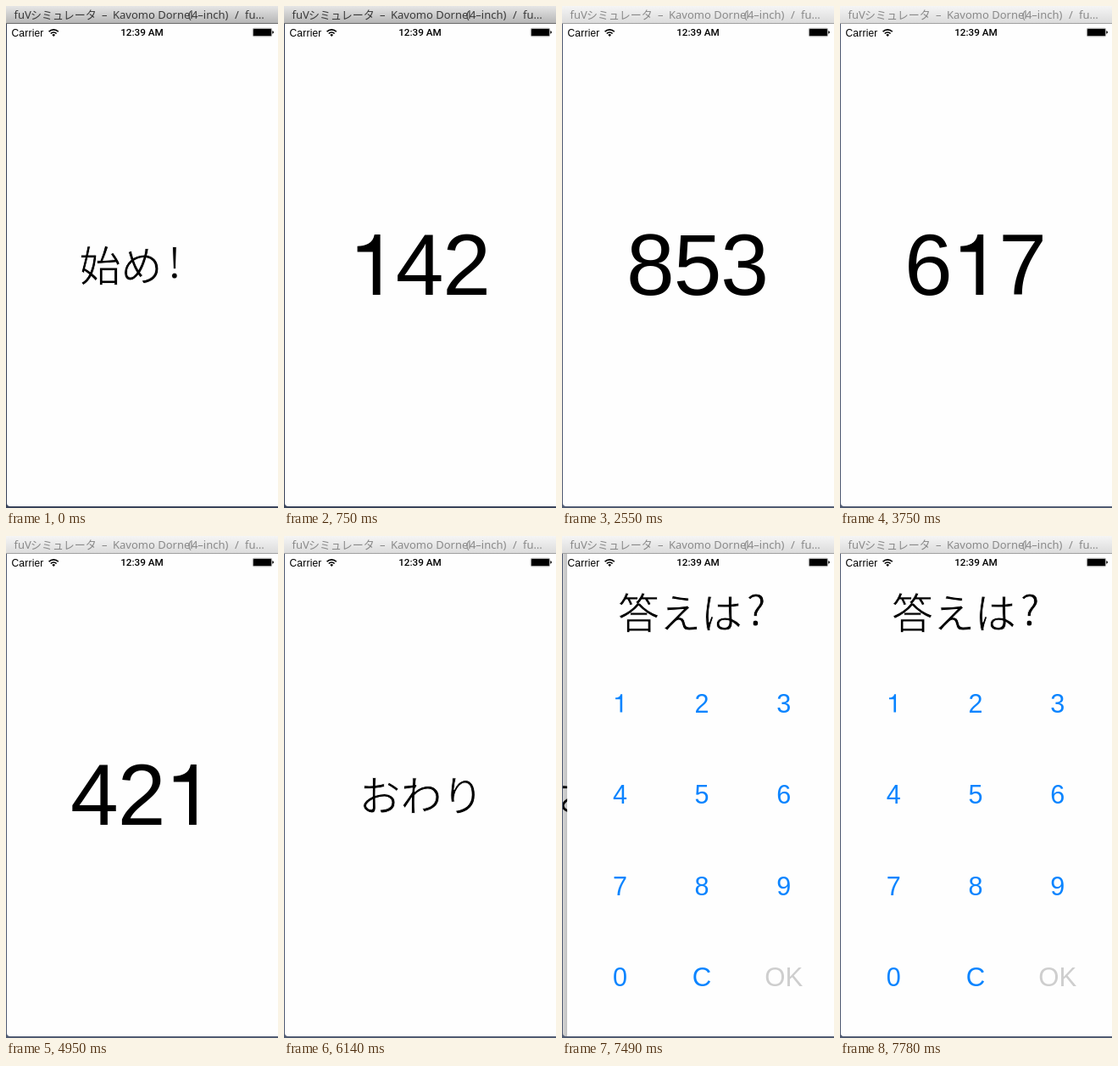
Write an HTML page that moves like this. It is 321x591 px and loops after 8 s.

```html
<!DOCTYPE html>
<html lang="ja">
<head>
<meta charset="utf-8">
<title>Number drill</title>
<style>
html, body { margin: 0; width: 100%; height: 100%; overflow: hidden; background: #fefefe; }
svg { display: block; width: 321px; height: 591px; }
text { white-space: pre; }
.sans { font-family: "Liberation Sans", Arial, sans-serif; }
/* the paper-coloured stroke thins the letters */
.kana { font: 49px "Noto Sans CJK JP", "Noto Sans CJK", sans-serif; stroke: #fefefe; stroke-width: .8px; }
.title { font: 13px "Noto Sans", "Noto Sans CJK JP", "Noto Sans CJK", sans-serif; }
.clock { font: 500 11.7px Roboto, "Liberation Sans", sans-serif; }
.mid { text-anchor: middle; }

/* window chrome: focused, then dimmed from 2250 ms */
.focused { animation: focused 8s step-end infinite; }
.idle { animation: idle 8s step-end infinite; }
@keyframes focused { 0% { opacity: 1; } 28.125%, 100% { opacity: 0; } }
@keyframes idle { 0% { opacity: 0; } 28.125%, 100% { opacity: 1; } }

/* page push: --p is the share of the way travelled */
#pages { animation: push 8s step-end infinite; }
@keyframes push {
  0% { --p: 0; }
  89.875% { --p: .144; }
  91.75% { --p: .854; }
  93.625% { --p: .984; }
  95.5% { --p: .998; }
  97.25%, 100% { --p: 1; }
}
#old { transform: translateX(calc(var(--p) * -96px)); }
#new { transform: translateX(calc((1 - var(--p)) * 320px)); }
#dim { opacity: calc(var(--p) * .1); }
#edge { opacity: min(1, calc(var(--p) * 100)); }
</style>
</head>
<body>
<svg viewBox="0 0 321 591" xmlns="http://www.w3.org/2000/svg">
  <defs>
    <linearGradient id="barOn" x2="0" y2="1">
      <stop stop-color="#e6e6e6"/><stop offset="1" stop-color="#b6b6b6"/>
    </linearGradient>
    <linearGradient id="barOff" x2="0" y2="1">
      <stop stop-color="#f5f5f5"/><stop offset="1" stop-color="#dcdcdc"/>
    </linearGradient>
    <linearGradient id="shade">
      <stop stop-opacity="0"/><stop offset="1" stop-opacity=".16"/>
    </linearGradient>
    <clipPath id="screen"><path d="M1 21H321V589H5Q1 589 1 585Z"/></clipPath>
    <path id="one" d="M37 0H28.2V-50.5H10V-57.2C20-57.6 28-60 30.2-70.9H37Z"/>
    <g id="caption" class="title">
      <text x="9.5" y="15">fuV</text>
      <text x="29" y="15">シミュレータ</text>
      <text x="113" y="15">–</text>
      <text x="126" y="15">Kavomo Dornel</text>
      <text x="215" y="15">(4–inch)</text>
      <text x="270" y="15">/</text>
      <text x="282" y="15">fu…</text>
    </g>
  </defs>

  <g class="focused">
    <rect width="321" height="591" fill="#39435a"/>
    <rect width="321" height="20" fill="url(#barOn)"/>
    <rect y="20" width="321" height="1" fill="#6c6c6c"/>
    <use href="#caption" fill="#3a3a3a"/>
  </g>
  <g class="idle">
    <rect width="321" height="591" fill="#4f5a72"/>
    <rect width="321" height="20" fill="url(#barOff)"/>
    <rect y="20" width="321" height="1" fill="#a0a0a0"/>
    <use href="#caption" fill="#8a8a8a"/>
  </g>

  <g clip-path="url(#screen)">
    <rect x="1" y="21" width="320" height="568" fill="#fefefe"/>
    <g id="pages">
      <g id="old">
        <g id="start">
          <text class="kana" x="86.5" y="324">始め</text>
          <text class="kana mid" x="199" y="319.5">!</text>
        </g>
        <text id="finish" class="kana" x="88.5" y="323.5">おわり</text>
      </g>
      <rect id="dim" x="1" y="21" width="320" height="568"/>
      <g id="new">
        <rect id="edge" x="-8" y="21" width="9" height="568" fill="url(#shade)"/>
        <rect x="1" y="21" width="320" height="568" fill="#fefefe"/>
        <text class="kana" x="61" y="108.5">答えは</text>
        <text class="kana mid" x="224" y="105">?</text>
        <g id="keys" fill="#0a84ff"></g>
      </g>
    </g>
  </g>

  <g id="status">
    <text class="sans" x="6.5" y="35.5" font-size="12" letter-spacing=".2">Carrier</text>
    <g fill="none" stroke="#000" stroke-width="1.7">
      <path d="M50.6 30.3A7.6 7.6 0 0 1 61.8 30.3"/>
      <path d="M52.8 32.5A4.6 4.6 0 0 1 59.6 32.5"/>
    </g>
    <path d="M56.2 35.9L54.3 34A2.7 2.7 0 0 1 58.1 34Z"/>
    <text class="clock mid" x="160.5" y="35.3">12:39 AM</text>
    <rect x="291.3" y="26.3" width="22.4" height="9.4" rx="1.5" fill="none" stroke="#555" stroke-width=".6"/>
    <rect x="292" y="27" width="21" height="8" rx=".6"/>
    <path d="M314.3 29.3Q316 29.6 316 31T314.3 32.7Z"/>
  </g>
</svg>
<script>
const LOOP = 8000;
const byId = id => document.getElementById(id);

function add(parent, tag, attrs, text = '') {
  const el = document.createElementNS('http://www.w3.org/2000/svg', tag);
  for (const key in attrs) el.setAttribute(key, attrs[key]);
  el.textContent = text;
  return parent.appendChild(el);
}

// Sets a label centred on x; the figure 1 is a plain stem without a foot.
function label(parent, str, x, y, size) {
  const g = add(parent, 'g', { 'aria-label': str });
  const pitch = size * 0.556;
  if (/\D/.test(str)) {
    add(g, 'text', { class: 'sans mid', x, y, 'font-size': size * 1.04 }, str);
    return g;
  }
  [...str].forEach((d, i) => {
    const left = x + (i - str.length / 2) * pitch;
    if (d === '1') {
      add(g, 'use', { href: '#one', transform: `translate(${left} ${y}) scale(${size / 100})` });
    } else {
      add(g, 'text', { class: 'sans mid', x: left + pitch / 2, y, 'font-size': size * 1.02 }, d);
    }
  });
  return g;
}

function show(el, from, to) {
  const at = (time, opacity) => ({ offset: time / LOOP, opacity, easing: 'step-end' });
  const frames = [at(from, 1), at(to, to < LOOP ? 0 : 1)];
  if (from > 0) frames.unshift(at(0, 0));
  if (to < LOOP) frames.push(at(LOOP, 0));
  el.animate(frames, { duration: LOOP, iterations: Infinity });
}

const numbers = ['142', '427', '239', '853', '563', '617', '958', '421', '268'];
const times = [750, 1350, 1950, 2550, 3150, 3750, 4350, 4950, 5540, 6140];

show(byId('start'), 0, times[0]);
numbers.forEach((n, i) => show(label(byId('old'), n, 160, 340, 100), times[i], times[i + 1]));
show(byId('finish'), times[9], LOOP);

['1', '2', '3', '4', '5', '6', '7', '8', '9', '0', 'C', 'OK'].forEach((key, i) => {
  const x = 63.3 + (i % 3) * 96.7;
  const y = 207.5 + Math.floor(i / 3) * 107.6;
  const g = label(byId('keys'), key, x, y, 30);
  if (key === 'OK') g.setAttribute('fill', '#cecece');
});
</script>
</body>
</html>
```
